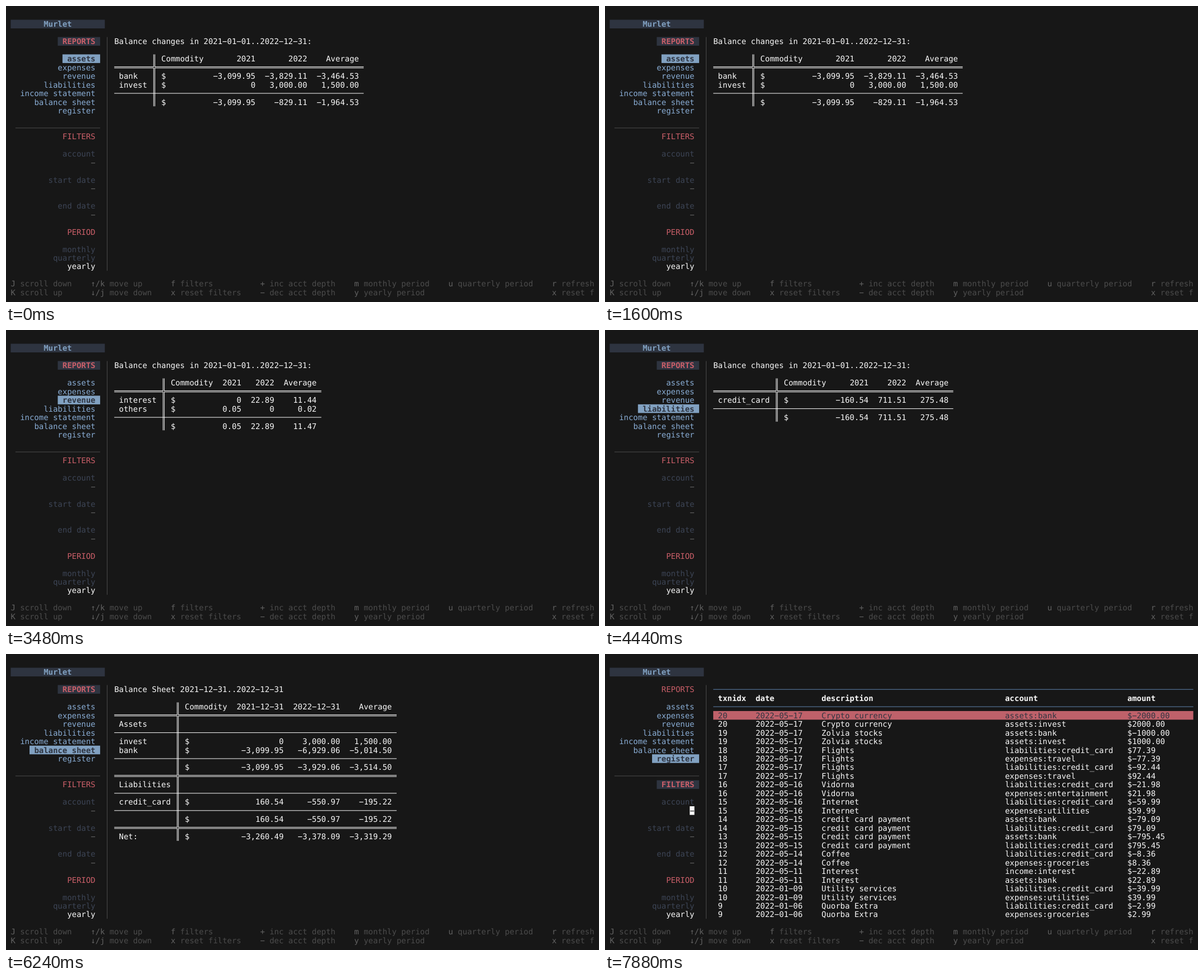
Animation of 1058x529 px, one loop 8 s. Source, as an HTML page:

```html
<!DOCTYPE html>
<html lang="en">
<head>
<meta charset="utf-8">
<title>Ledger dashboard</title>
<style>
  html, body { margin: 0; height: 100%; overflow: hidden; background: #171717; }
  svg { display: block; width: 100vw; height: 100vh; }
  text {
    font: 13.95px "DejaVu Sans Mono", monospace;
    white-space: pre;
    text-rendering: geometricPrecision;
  }
  .bold { font-weight: 700; }
</style>
</head>
<body>
<svg id="screen" viewBox="0 0 1058 529"></svg>
<script>
const CELL = 1058 / 126, LINE = 15.47, LOOP = 8000;
const BG = '#171717', FG = '#fafafa', SLATE = '#2e3440', DIM = '#3d4556', BLUE = '#81a1c1',
      SKY = '#8aaed6', RED = '#bf616a', CORAL = '#cb5f69', GREY = '#4c4c4c', KEY = '#626262';

// Everything sits on a grid of character cells
const mid = row => 32.3 + row * LINE;
const box = (x, y, w, h, fill) => `<rect x="${x}" y="${y}" width="${w}" height="${h}" fill="${fill}"/>`;
const fillCells = (from, to, row, color) =>
  box(from * CELL, mid(row) - LINE / 2, (to - from) * CELL, LINE, color);
const text = (col, row, str, color = FG, bold = false) =>
  `<text x="${(col * CELL).toFixed(2)}" y="${(mid(row) + 5).toFixed(2)}" fill="${color}"` +
  `${bold ? ' class="bold"' : ''}>${str.replace(/-/g, '−')}</text>`;
const textRight = (col, row, str, color, bold) => text(col - str.length, row, str, color, bold);
const hline = (from, to, y, color) => box(from * CELL, y - .5, (to - from) * CELL, 1, color);
const vline = (x, from, to, color) =>
  box(x - .5, mid(from) - LINE / 2, 1, (to - from) * LINE, color);

const REPORTS = ['assets', 'expenses', 'revenue', 'liabilities', 'income statement', 'balance sheet', 'register'];
const PERIODS = ['monthly', 'quarterly', 'yearly'];

const HELP = [
  [1, 'J scroll down', 'K scroll up'],
  [18, '↑/k move up', '↓/j move down'],
  [35, 'f filters', 'x reset filters'],
  [54, '+ inc acct depth', '- dec acct depth'],
  [74, 'm monthly period', 'y yearly period'],
  [94, 'u quarterly period'],
  [116, 'r refresh', 'x reset f']
];

function heading(label, row, active) {
  return (active ? fillCells(11, 20, row, SLATE) : '') + textRight(19, row, label, CORAL, active);
}

function sidebar({ selected, period, filtering }) {
  let out = fillCells(1, 21, 0, SLATE) + text(8, 0, 'Murlet', BLUE, true);
  out += heading('REPORTS', 2, !filtering);
  REPORTS.forEach((name, i) => {
    const on = i === selected;
    if (on) out += fillCells(18 - name.length, 20, 4 + i, BLUE);
    out += textRight(19, 4 + i, name, on ? SLATE : SKY, on);
  });
  out += hline(2, 20, mid(12), GREY) + heading('FILTERS', 13, filtering);
  ['account', 'start date', 'end date'].forEach((name, i) => {
    const row = 15 + 3 * i, cursor = filtering && i === 0;
    out += textRight(19, row, name, DIM);
    if (cursor) out += fillCells(18, 19, row + 1, FG);
    out += text(18, row + 1, '-', cursor ? BG : KEY);
  });
  out += heading('PERIOD', 24, false);
  PERIODS.forEach((name, i) => out += textRight(19, 26 + i, name, i === period ? FG : DIM));
  return out + vline(21.5 * CELL, 2, 29, GREY);
}

function help() {
  return HELP.map(([col, ...lines]) => lines.map((line, i) => {
    const cut = line.indexOf(' ');
    return text(col, 30 + i, line.slice(0, cut), KEY) + text(col + cut + 1, 30 + i, line.slice(cut + 1), GREY);
  }).join('')).join('');
}

// Lines: '=' double rule, '-' single rule, otherwise "name|value|value..."
function table(title, ...lines) {
  const rows = lines.map(line => line.split('|'));
  const nameWidth = Math.max(...rows.map(r => r[0].length));
  const widths = rows[0].slice(1).map((_, i) => Math.max(...rows.map(r => (r[i + 1] || '').length)));
  const bar = 25 + nameWidth, first = bar + 2;
  const end = first + 10 + widths.reduce((sum, w) => sum + w + 2, 0);
  const x = (bar + .5) * CELL, gap = 1.1;
  let out = text(23, 2, title);
  out += vline(x - gap, 4, 4 + rows.length, FG) + vline(x + gap, 4, 4 + rows.length, FG);
  rows.forEach(([name, ...values], i) => {
    const row = 4 + i, y = mid(row);
    if (name === '-') out += hline(23, end, y, FG);
    else if (name === '=') {
      out += hline(23, end, y - gap, FG) + hline(23, end, y + gap, FG);
      // Open the middle of the crossing
      out += box(x - 1.6, y - .6, 3.2, 1.2, BG) + box(x - .6, y - 1.6, 1.2, 3.2, BG);
    } else {
      out += text(24, row, name);
      if (values.length) out += text(first, row, i ? '$' : 'Commodity');
      let right = first + 9;
      values.forEach((value, k) => out += textRight(right += widths[k] + 2, row, value));
    }
  });
  return out;
}

const CARD = 'liabilities:credit_card', BANK = 'assets:bank';
const ENTRIES = [
  ['05-17', 'Crypto currency', BANK, 'assets:invest', -2000],
  ['05-17', 'Zolvia stocks', BANK, 'assets:invest', -1000],
  ['05-17', 'Flights', CARD, 'expenses:travel', 77.39],
  ['05-17', 'Flights', CARD, 'expenses:travel', -92.44],
  ['05-16', 'Vidorna', CARD, 'expenses:entertainment', -21.98],
  ['05-16', 'Internet', CARD, 'expenses:utilities', -59.99],
  ['05-15', 'credit card payment', BANK, CARD, -79.09],
  ['05-15', 'Credit card payment', BANK, CARD, -795.45],
  ['05-14', 'Coffee', CARD, 'expenses:groceries', -8.36],
  ['05-11', 'Interest', 'income:interest', BANK, -22.89],
  ['01-09', 'Utility services', CARD, 'expenses:utilities', -39.99],
  ['01-06', 'Quorba Extra', CARD, 'expenses:groceries', -2.99]
];

function register() {
  const cols = [24, 32, 46, 85, 111];
  const put = (row, cells, color, bold) => cells.map((c, i) => text(cols[i], row, c, color, bold)).join('');
  let out = hline(23, 125, mid(2), '#5e81ac') + hline(23, 125, mid(4), '#5e81ac');
  out += put(3, ['txnidx', 'date', 'description', 'account', 'amount'], FG, true);
  out += fillCells(23, 125, 5, RED);
  ENTRIES.forEach(([day, label, from, to, amount], i) => {
    const start = [`${20 - i}`, `2022-${day}`, label], row = 5 + 2 * i;
    out += put(row, [...start, from, '$' + amount.toFixed(2)], i ? FG : SLATE);
    out += put(row + 1, [...start, to, '$' + (-amount).toFixed(2)]);
  });
  return out;
}

const YEARS = 'Balance changes in 2021-01-01..2022-12-31:';
const HEAD = '|2021|2022|Average';
const SPENDING = [
  'rent|2,300.00|0|1,150.00', 'household|800.00|0|400.00', 'utilities|100.54|99.98|100.26',
  'fitness|60.00|0|30.00', 'entertainment|0|21.98|10.99', 'travel|0|15.05|7.52',
  'groceries|0|3.48|1.74', '-', '|3,260.54|140.49|1,700.52'
];
const EARNING = ['interest|0|22.89|11.44', 'others|0.05|0|0.02', '-', '|0.05|22.89|11.47'];

const assets = table(YEARS, HEAD, '=', 'bank|-3,099.95|-3,829.11|-3,464.53',
  'invest|0|3,000.00|1,500.00', '-', '|-3,099.95|-829.11|-1,964.53');
const assetsMonthly = table('Balance changes in 2021-12-01..2022-05-31:',
  '|2021-12|2022-01|2022-02|2022-03|2022-04|2022-05|Average', '=',
  'bank|-3,099.95|22.54|0|0|0|-3,851.65|-1,154.84', 'invest|0|0|0|0|0|3,000.00|500.00', '-',
  '|-3,099.95|22.54|0|0|0|-851.65|-654.84');
const expenses = table(YEARS, HEAD, '=', ...SPENDING);
const revenue = table(YEARS, HEAD, '=', ...EARNING);
const liabilities = table(YEARS, HEAD, '=', 'credit_card|-160.54|711.51|275.48', '-', '|-160.54|711.51|275.48');
const income = table('Income Statement 2021-01-01..2022-12-31', HEAD, '=', 'Revenues', '-', ...EARNING,
  '=', 'Expenses', '-', ...SPENDING, '=', 'Net:|-3,260.49|-117.60|-1,689.04');
const balance = table('Balance Sheet 2021-12-31..2022-12-31', '|2021-12-31|2022-12-31|Average', '=',
  'Assets', '-', 'invest|0|3,000.00|1,500.00', 'bank|-3,099.95|-6,929.06|-5,014.50', '-',
  '|-3,099.95|-3,929.06|-3,514.50', '=', 'Liabilities', '-', 'credit_card|160.54|-550.97|-195.22', '-',
  '|160.54|-550.97|-195.22', '=', 'Net:|-3,260.49|-3,378.09|-3,319.29');
const entries = register();

const view = (start, selected, report, period = 2, filtering = false) =>
  ({ start, selected, report, period, filtering });
const TIMELINE = [
  view(0, 0, assets),
  view(760, 0, assets, 0),
  view(800, 0, assetsMonthly, 0),
  view(1600, 0, assets),
  view(2560, 1, expenses),
  view(3480, 2, revenue),
  view(4440, 3, liabilities),
  view(5360, 4, income),
  view(6240, 5, balance),
  view(7200, 6, entries),
  view(7880, 6, entries, 2, true)
];

const screen = document.getElementById('screen');
const origin = performance.now();
let shown;

function draw(now) {
  const t = Math.max(0, now - origin) % LOOP;
  const current = TIMELINE.findLast(v => v.start <= t);
  if (current !== shown) {
    shown = current;
    screen.innerHTML = sidebar(current) + current.report + help();
  }
  requestAnimationFrame(draw);
}
draw(origin);
</script>
</body>
</html>
```
